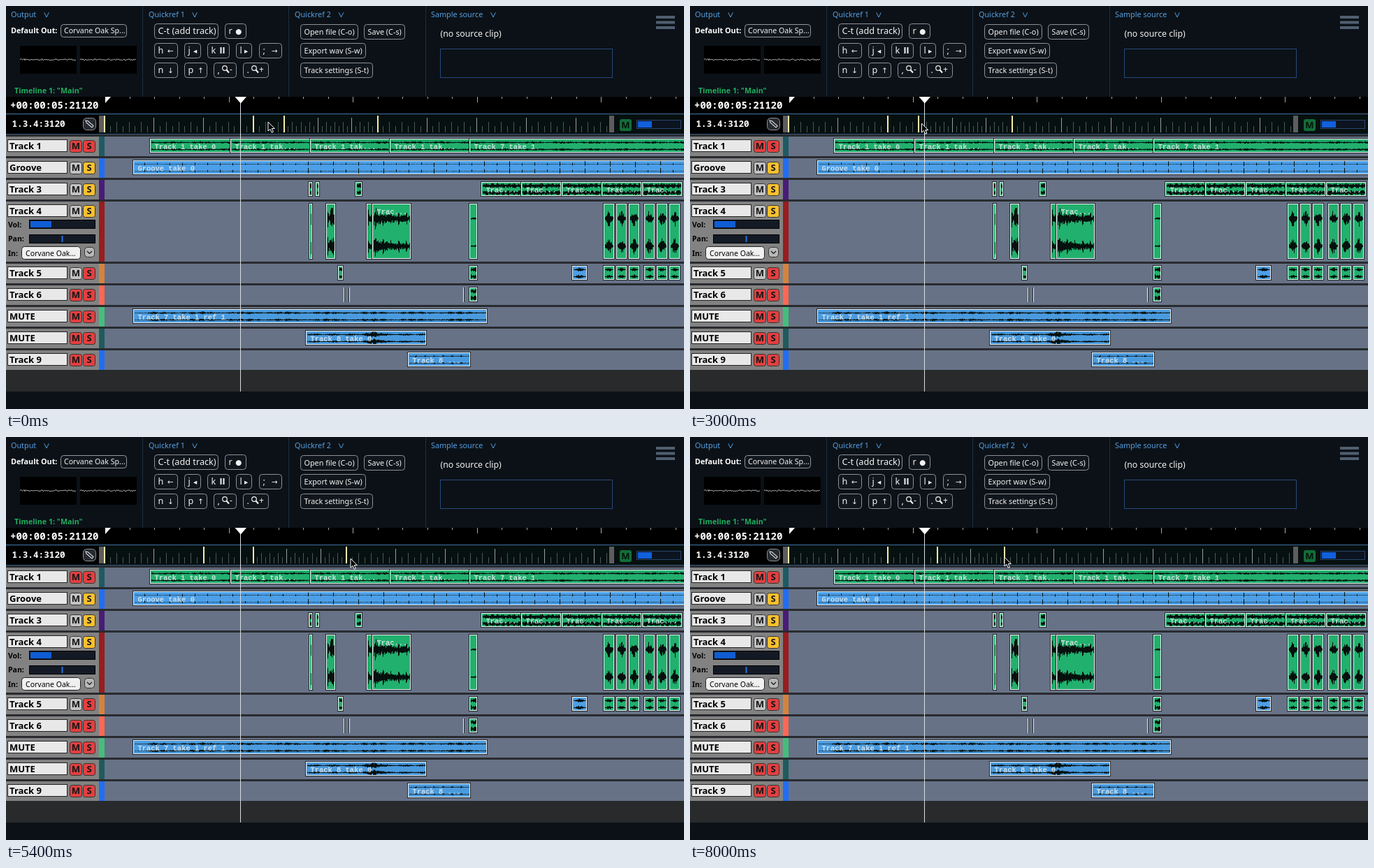
An HTML page for the animation above (8.05 s loop, 970x577 px).

```html
<!DOCTYPE html>
<html lang="en">
<head>
<meta charset="utf-8">
<title>Audio timeline</title>
<style>
html, body { margin: 0; width: 100%; height: 100%; overflow: hidden; background: #0b1117; }
svg { display: block; width: 970px; height: 577px; }
text { font-family: "Noto Sans", "Open Sans", sans-serif; white-space: pre; }
.b { font-weight: 700; }
.mono { font-family: "Noto Sans Mono", monospace; font-weight: 600; }
.clip { font-family: "Liberation Mono", monospace; font-weight: 700; }
.sym { font-family: "DejaVu Sans", sans-serif; }
</style>
</head>
<body>
<svg id="stage" viewBox="0 0 970 577"></svg>
<script>
const stage = document.getElementById('stage');
let out = '';

const rect = (x, y, w, h, fill, more = '') =>
  out += `<rect x="${x}" y="${y}" width="${w}" height="${h}" fill="${fill}" ${more}/>`;
const path = (d, more) => out += `<path d="${d}" ${more}/>`;
const text = (x, y, s, size = 10.8, fill = '#f2f2f2', cls = '', more = '') =>
  out += `<text x="${x}" y="${y}" font-size="${size}" fill="${fill}" class="${cls}" ${more}>${s}</text>`;
const box = (x, y, w, h, stroke, fill = 'none', r = 0) =>
  rect(x + .5, y + .5, w - 1, h - 1, fill, `stroke="${stroke}" rx="${r}"`);
const line = (d, stroke, width = 1) => path(d, `fill="none" stroke="${stroke}" stroke-width="${width}"`);

function random(seed) {
  return () => {
    seed = (seed * 16807 + 11) % 2147483647;
    return seed / 2147483647;
  };
}

// Header panels
const BLUE = '#559fe2';
rect(0, 0, 970, 577, '#0b1117');
line('M195.5 0V130M404.5 0V130M600.5 0V130', '#1d2d3e');
[['Output', 7, 54], ['Quickref 1', 204, 266], ['Quickref 2', 413, 475.5], ['Sample source', 608, 693]]
  .forEach(([name, x, v]) => {
    text(x, 16, name, 10.8, BLUE);
    line(`M${v + .7} 9.3L${v + 4} 16L${v + 7.3} 9.3`, BLUE);
  });
text(7, 39, 'Default Out:', 10.8, '#fff', 'b');
box(78, 26, 95, 19, '#93979c', '#12171d', 4);
text(83, 39, 'Corvane Oak Sp...', 10.6);
[20, 106].forEach((x, i) => {
  rect(x, 57, 81, 40, '#000');
  const rnd = random(61 + i * 40);
  let d = `M${x} 77`;
  for (let k = 1; k <= 80; k++) d += `L${x + k} ${(76.8 + (rnd() - .5) * 2.4).toFixed(1)}`;
  line(d, '#b8b8b8', .9);
});
text(12, 125, 'Timeline 1: "Main"', 10.7, '#20ae5e', 'b');

const button = (x, y, w, label, size = 12.7, sym = '', sx = 0) => {
  box(x, y, w, 22, '#8b9096', '#11161c', 4);
  text(x + 5.5, y + (size > 12 ? 15.4 : 14.6), label, size);
  if (sym) text(sx, y + 14.7, sym, 10.5, '#f2f2f2', 'sym');
};
button(212, 25, 92, 'C-t (add track)');
button(313, 25, 31, 'r', 12.7, '●', 328);
button(212, 53, 34, 'h', 12.7, '←', 231);
button(255, 53, 24, 'j', 12.7, '◂', 268);
button(288, 53, 32, 'k', 12.7);
line('M307.5 59V68M311.5 59V68', '#f2f2f2', 2);
button(329, 53, 23, 'l', 12.7, '▸', 341);
button(362, 53, 33, ';', 12.7, '→', 380);
button(212, 81, 34, 'n', 12.7, '↓', 231);
button(255, 81, 33, 'p', 12.7, '↑', 274);
button(297, 81, 33, ',', 12.7);
button(339, 81, 37, '.', 12.7);
[[309, '-'], [351, '+']].forEach(([x, sign]) => {
  out += `<circle cx="${x + 4}" cy="89" r="3.3" fill="none" stroke="#f2f2f2" stroke-width="1.2"/>`;
  line(`M${x + 6.5} 91.5L${x + 10} 95.5`, '#f2f2f2', 2);
  text(x + 11, 95, sign, 12);
});
button(421, 26, 83, 'Open file (C-o)', 10.8);
button(512, 26, 59, 'Save (C-s)', 10.8);
button(421, 53, 94, 'Export wav (S-w)', 10.8);
button(421, 81, 104, 'Track settings (S-t)', 10.8);
text(621.5, 44, '(no source clip)', 12.3);
box(621, 61, 247, 42, '#284878');
[14, 21.5, 29].forEach(y => rect(930, y, 27, 4, '#505f70'));

// Time rulers
rect(0, 130, 970, 25, '#000');
rect(0, 155, 970, 28, '#071010');
rect(0, 156, 133, 27, '#000');
line('M0 154.5H970', '#406f9f');
line('M0 183.5H970', '#34587c');
text(6, 147, '+00:00:05:21120', 14.05, '#fff', 'mono');
text(8.5, 173, '1.3.4:3120', 12.7, '#fff', 'mono');
let secs = '';
for (let s = 1; s < 24; s++) secs += `M${Math.round(142 + s * 35.5) - .5} 130V${s % 5 ? 133 : 138}`;
line(secs, '#a4a4a4');
path('M142 130H150L142 139Z', 'fill="#fff"');
box(110, 160, 19, 18, '#8b9096', '#252b31', 5);
path('M114 164L117 164.5L125 171.5L123 174L115 167Z', 'fill="none" stroke="#ddd" stroke-width="1.1"');
rect(133, 157, 8, 24, '#5d5d5d');
rect(863, 157, 7, 24, '#5d5d5d');
rect(878, 162, 17, 17, '#136d3a', 'rx="3"');
text(886.5, 175.4, 'M', 13, '#061309', 'b', 'text-anchor="middle"');
box(902, 163, 64, 13, '#29456f', '#0c1420');
rect(904, 165, 20, 9, '#1260dc');

// Track rows
const GREEN = '#22b06e', SKY = '#4c9fe8', RED = '#e23f40', YEL = '#fac02f', GRAY = '#c3c3c3';
rect(0, 184, 970, 337, '#292b2f');
rect(0, 521, 970, 31, '#282a2b');
const rows = [
  ['Track 1', 200, '#1f5b62', RED, RED], ['Groove', 231, '#206ef4', GRAY, YEL],
  ['Track 3', 262, '#491c76', GRAY, YEL], ['Track 4', 293, '#981d1d', GRAY, YEL],
  ['Track 5', 382, '#d6823d', GRAY, RED], ['Track 6', 413, '#fc6854', RED, RED],
  ['MUTE', 444, '#45bd7c', RED, RED], ['MUTE', 475, '#205b5c', RED, RED],
  ['Track 9', 506, '#206ef4', RED, RED]
];
rows.forEach(([name, y, color, m, s], i) => {
  const h = i === 3 ? 86 : 28;
  rect(0, y - 13, 133, h, '#828282');
  rect(133, y - 13, 8, h, color);
  rect(141, y - 13, 829, h, '#677287');
  box(2, y - 9, 86, 18, '#222', '#e8e8e8');
  text(5, y + 4.8, name, 13, '#000', 'b');
  [['M', 91, m], ['S', 110, s]].forEach(([c, x, fill]) => {
    box(x, y - 8, 18, 18, '#343434', fill, 3);
    text(x + 9, y + 5.4, c, 13, '#151515', 'b', 'text-anchor="middle"');
  });
});
text(3, 317, 'Vol:', 10.5, '#000', 'b');
text(3, 337, 'Pan:', 10.5, '#000', 'b');
text(3, 357.5, 'In:', 10.5, '#000', 'b');
box(33, 306, 95, 13, '#000', '#141a25');
rect(35, 308, 30, 9, '#105cd4');
box(33, 327, 95, 13, '#000', '#141a25');
rect(79.5, 329, 2, 9, '#2671e0');
box(22, 344, 85, 19, '#222', '#f0f0f0', 4);
text(28, 357.5, 'Corvane Oak...', 10.5, '#000');
box(112, 345, 15, 15, '#333', '#b8b8b8', 4);
line('M116 351L119.5 354.5L123 351', '#111', 1.2);

// Two-channel waveform: env(u, x) gives the half height as a share of the clip
function wave(x, y, w, h, env, seed) {
  const rnd = random(seed * 977 + 13);
  let d = '';
  [.27, .77].forEach(c => {
    for (let px = 2; px < w - 1; px++) {
      const a = env(px / w, x + px) * h, up = a * (.35 + rnd() * .65), down = a * (.35 + rnd() * .65);
      const mid = y + h * c;
      d += `M${x + px + .5} ${(mid - up).toFixed(1)}V${(mid + down).toFixed(1)}`;
    }
  });
  line(d, '#06100d');
}
const steady = (u, x) => .045 + .055 * Math.abs(Math.sin(x * .31) * Math.sin(x * .073));
const beats = (u, x) => x % 18 < 1 ? (x > 430 && x % 4 < 2 ? .23 : .12) : .018;
const busy = (u, x) => .1 + .1 * Math.abs(Math.sin(x * .4));
const hit = u => .02 + .13 * Math.exp(-(((u - .48) / .25) ** 2));
const burst = u => .06 + .15 * Math.abs(Math.cos(u * 5));
const decay = (u, x) => .055 + .1 * Math.exp(-u * 3) + (x % 11 < 2 ? .06 : 0);
const quiet = (u, x) => u < .04 ? .02 : .035 + .07 * Math.abs(Math.sin(x * .23) * Math.sin(x * .051));
const swell = u => .03 + .16 * Math.exp(-(((u - .57) / .06) ** 2)) + .05 * Math.abs(Math.sin(u * 21));
const faint = (u, x) => .025 + (x % 13 < 3 ? .04 : 0);

function clip(x, end, row, env, label = '', fill = GREEN) {
  const y = rows[row][1] - 10, w = end - x, h = row === 3 ? 79 : 20;
  rect(x - 1, y - 1, w + 2, h + 2, '#20282d');
  rect(x, y, w, h, fill);
  wave(x, y, w, h, env, x + row);
  box(x, y, w, h, '#f1f4f4');
  if (label) text(x + 6.5, y + 14.5, label, 10.45, 'rgba(232,238,240,.82)', 'clip');
}
[[206, 321, 'Track 1 take 0'], [321, 435, 'Track 1 tak...'], [435, 549, 'Track 1 tak...'],
 [549, 663, 'Track 1 tak...'], [663, 972, 'Track 7 take 1']]
  .forEach(([a, b, s]) => clip(a, b, 0, steady, s));
clip(182, 972, 1, beats, 'Groove take 0', SKY);
[[433, 438], [443, 448], [500, 509]].forEach(([a, b]) => clip(a, b, 2, busy));
[680, 737, 795, 852, 910].forEach(x => clip(x, x + 57, 2, busy, 'Trac...'));
clip(434, 438, 3, hit);
clip(458, 471, 3, burst);
clip(516, 525, 3, decay);
clip(524, 579, 3, decay, 'Trac...');
clip(663, 674, 3, () => .02);
clip(475, 482, 4, busy);
clip(663, 674, 4, busy);
clip(810, 831, 4, hit, '', SKY);
[855, 873, 891, 913, 931, 949].forEach(x => {
  clip(x, x + 15, 3, hit);
  clip(x, x + 15, 4, hit);
});
line('M483.5 403V424M491.5 403V424M654.5 403V424', '#f1f4f4');
line('M484.5 403V424M490.5 403V424M655.5 403V424', '#20282d');
clip(663, 674, 5, busy);
clip(182, 688, 6, quiet, 'Track 7 take 1 ref 1', '#4a9ade');
clip(429, 601, 7, swell, 'Track 8 take 0', '#4a9ade');
clip(575, 664, 8, faint, 'Track 8 ...', '#4a9ade');

// Moving parts
path('', 'id="minor" stroke="#485955"');
path('', 'id="major" stroke="#93a19d"');
path('', 'id="marks" stroke="#f3edaa" stroke-width="2"');
line('M335.5 138V552', '#d9dde2');
path('M327.5 130H344L335.8 139.5Z', 'fill="#fff"');
path('M0 0V13L3 10.3L5.2 15.2L7.4 14.2L5.2 9.5H9.3Z', 'id="cursor" fill="#000" stroke="#fff" stroke-width="1"');
stage.innerHTML = out;
const [minor, major, marks, cursor] = ['minor', 'major', 'marks', 'cursor'].map(id => document.getElementById(id));

const LOOP = 8050, START = 141, UNIT = 8.875, END = 862;
const pointer = [
  [0, 375, 166], [900, 364, 167], [1400, 340, 169], [1620, 354, 168], [2250, 283, 167],
  [2550, 288, 168], [2900, 329, 168], [3650, 379, 169], [4300, 356, 170], [4500, 358, 171],
  [5100, 486, 174], [5400, 493, 174], [6200, 458, 173], [7100, 450, 172], [8050, 450, 172]
];
const first = [[1620, 24], [2220, 16]];
const second = [[2900, 5], [3620, 10], [4300, 8]];
const third = [[5420, 15], [6150, 12], [6400, 12], [7100, 10.8]];

// Eased value of one column of a key list
function at(keys, t, col = 1) {
  if (t <= keys[0][0]) return keys[0][col];
  const i = keys.findIndex(k => k[0] > t);
  if (i < 0) return keys[keys.length - 1][col];
  const a = keys[i - 1], b = keys[i], u = (t - a[0]) / (b[0] - a[0]);
  return a[col] + (b[col] - a[col]) * u * u * (3 - 2 * u);
}
const snap = (v, step) => Math.round(v / step) * step;

function draw(now) {
  const t = Math.floor(now % LOOP / 50) * 50;
  const a = START + snap(at(first, t), 1) * UNIT;
  const b = a + snap(at(second, t), 1) * UNIT;
  const c = b + snap(at(third, t), .6) * UNIT;
  const stops = [START, a, b, c, END];
  let small = '', large = '', bold = '';
  for (let s = 0; s < 4; s++) {
    const step = s === 2 ? 48.3 / 8 : UNIT;
    for (let k = 1; stops[s] + k * step < stops[s + 1] - 1; k++) {
      const x = Math.round(stops[s] + k * step) - .5;
      if (k % 8) small += `M${x} ${k % 2 ? 172 : 166}V181`;
      else large += `M${x} 160V181`;
    }
    bold += `M${Math.round(stops[s])} 157V181`;
  }
  minor.setAttribute('d', small);
  major.setAttribute('d', large);
  marks.setAttribute('d', bold);
  cursor.setAttribute('transform', `translate(${at(pointer, t)} ${at(pointer, t, 2)})`);
}
const begin = performance.now();
function frame() {
  draw(performance.now() - begin);
  requestAnimationFrame(frame);
}
frame();
</script>
</body>
</html>
```
